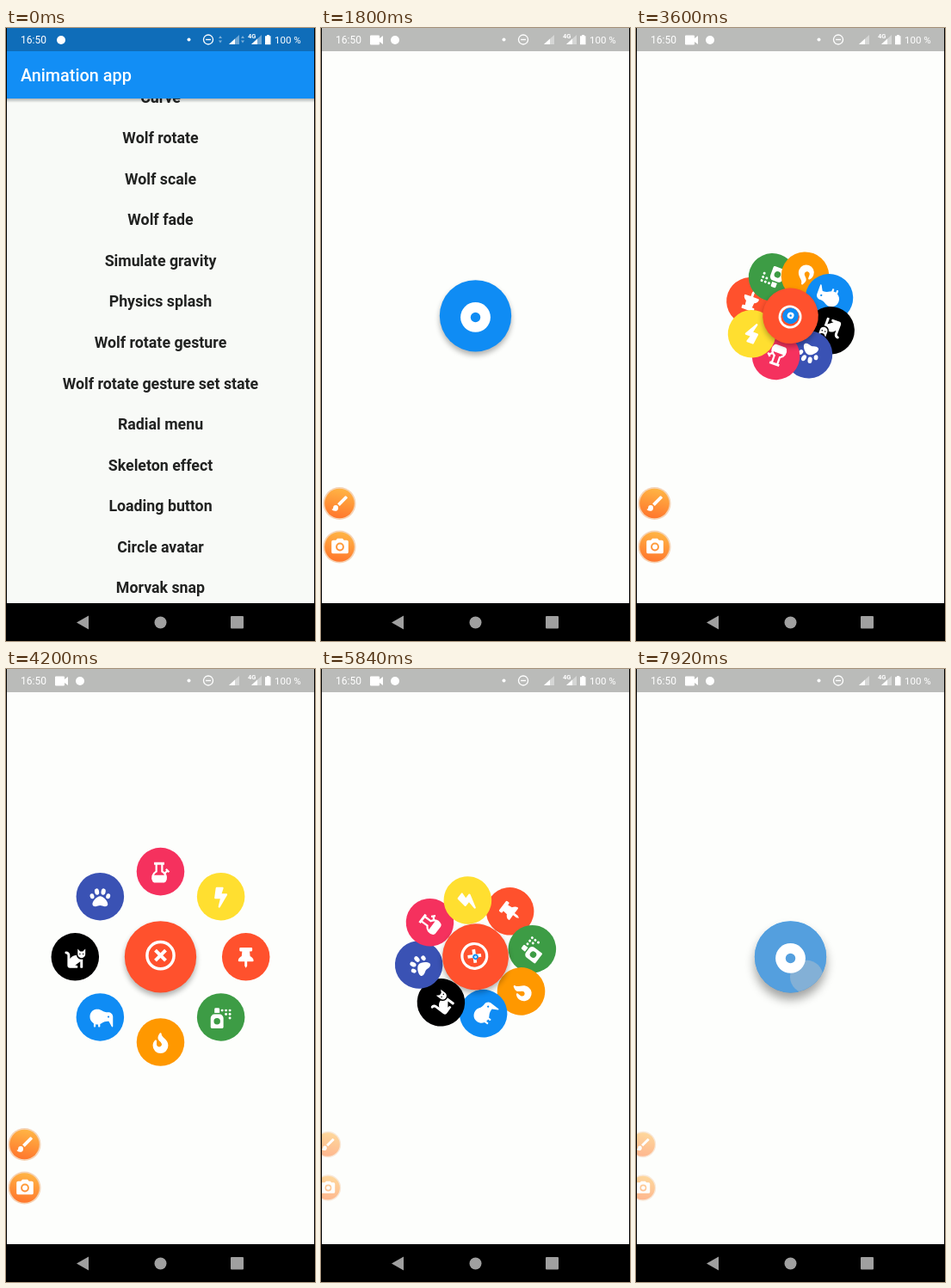
Animation, 359 px wide and 713 px high, one loop 8000 ms. Source, as an HTML page:

```html
<!DOCTYPE html>
<html lang="en">
<head>
<meta charset="utf-8">
<title>Radial menu</title>
<style>
html, body { margin: 0; width: 100%; height: 100%; overflow: hidden; background: #000; }
svg { display: block; width: 100%; height: 100%; font-family: Roboto, Arial, sans-serif; }
</style>
</head>
<body>
<svg id="stage" viewBox="0 0 359 713"></svg>
<script>
const LOOP = 8000, DP = 0.992, R = 28 * DP, CX = 179.5, CY = 334.8;
const BLUE = '#0f8cf4', RED = '#ff512d';

// Moments at which the screen refreshes: [first, last, count]
const refreshes = [
  [0, 0, 1], [40, 840, 17], [880, 1360, 7], [1560, 1800, 3], [3080, 3200, 2],
  [3360, 3600, 3], [3760, 3880, 2], [4040, 4040, 1], [4200, 4320, 2], [4560, 4960, 6],
  [5440, 5560, 2], [5760, 5840, 2], [6040, 6480, 6], [6640, 6640, 1], [7840, 7920, 2]
].flatMap(([a, b, n]) => Array.from({ length: n },
  (_, i) => n < 2 ? a : a + Math.round((b - a) * i / (n - 1) / 40) * 40));

const rows = ['Curve', 'Wolf rotate', 'Wolf scale', 'Wolf fade', 'Simulate gravity',
  'Physics splash', 'Wolf rotate gesture', 'Wolf rotate gesture set state', 'Radial menu',
  'Skeleton effect', 'Loading button', 'Circle avatar', 'Morvak snap'];

const path = d => `<path fill-rule="evenodd" d="${d}"/>`;
const dot = (x, y, r) => `<circle cx="${x}" cy="${y}" r="${r}"/>`;
const toe = (x, y, rx, ry, a) =>
  `<ellipse rx="${rx}" ry="${ry}" transform="translate(${x} ${y}) rotate(${a})"/>`;

// Clockwise from the right: colour, icon width, icon
const items = [
  [RED, 384, path('M298 214L286 96h42a24 24 0 0 0 24-24V24a24 24 0 0 0-24-24H56a24 24 0 0 0-24 24v48a24 24 0 0 0 24 24h42L86 214C37 237 0 277 0 328a24 24 0 0 0 24 24h136v104l32 56 32-56V352h136a24 24 0 0 0 24-24c0-51-38-91-86-114z')],
  ['#3d9c45', 512, path('M224 128V32a32 32 0 0 0-32-32h-64a32 32 0 0 0-32 32v96zM224 160H96a96 96 0 0 0-96 96v224a32 32 0 0 0 32 32h256a32 32 0 0 0 32-32V256a96 96 0 0 0-96-96zM160 416a80 80 0 1 1 0-160 80 80 0 0 1 0 160z')
    + [[288, 64], [384, 64], [480, 64], [384, 160], [480, 160], [480, 256]].map(([x, y]) => dot(x, y, 32)).join('')],
  ['#ff9800', 384, path('M216 24c0-24-31-33-44-13C48 192 224 200 224 288c0 36-29 64-65 64s-63-30-63-65v-85c0-22-26-33-41-17C28 213 0 261 0 320a192 192 0 0 0 384 0c0-170-168-193-168-296z')],
  [BLUE, 512, path('M576 218C573 157 518 112 458 112h-10c-53 0-104-16-147-46-42-29-96-42-154-29C129 41 0 78 0 224c0 71 39 133 96 166v74q0 16 16 16h16q16 0 16-16v-54q32 8 64 5v49q0 16 16 16h16q16 0 16-16v-59q22-8 40-20c46-30 98-49 152-49h24l74 136c8 14 30 8 30-8zM464 248a24 24 0 1 1 0-48 24 24 0 0 1 0 48z')],
  ['#000', 512, path('M291 192c-20 0-107 2-163 86v-86a96 96 0 0 0-96-96 32 32 0 0 0 0 64 32 32 0 0 1 32 32v256a64 64 0 0 0 64 64h176q16 0 16-16v-16a32 32 0 0 0-32-32h-32l128-96v144q0 16 16 16h32q16 0 16-16V290c-75 22-144-28-157-98zM448 96h-64l-64-64v134a96 96 0 0 0 192 0V32zM376 176a16 16 0 1 1 0-32 16 16 0 0 1 0 32zM456 176a16 16 0 1 1 0-32 16 16 0 0 1 0 32z')],
  ['#3a52b4', 512, path('M256 224c-79 0-192 123-192 200 0 35 27 56 72 56 49 0 81-25 120-25 40 0 72 25 120 25 45 0 72-21 72-56 0-77-113-200-192-200z')
    + toe(56, 224, 52, 65, -15) + toe(175, 112, 55, 80, -12) + toe(337, 112, 55, 80, 12) + toe(456, 224, 52, 65, 15)],
  ['#f5315e', 448, path('M302 512c24 0 45-13 57-33a190 190 0 0 0-2-194l43-43 21 21 34-34-76-76-34 34 21 21-39 39q-17-17-39-29V64h32V0H64v64h32v154A192 192 0 0 0 26 479c12 20 33 33 56 33zM120 259l24-13V64h96v182l24 13c25 15 44 36 57 61H63c13-25 32-46 57-61z')],
  ['#ffdf30', 320, path('M296 160H180l43-130C227 15 216 0 200 0H56C44 0 34 9 32 21L0 261c-2 14 10 27 24 27h119L97 482c-4 16 8 30 23 30 8 0 16-4 21-12l176-304c9-16-3-36-21-36z')]
];

const smallButton = ([color, width, icon]) => `<g class="item"><circle r="${R}" fill="${color}"/>
  <g fill="#fff" transform="translate(0 1.1) scale(${24 * DP / 512}) translate(${-width / 2} -256)">${icon}</g></g>`;

const bigButton = (id, color, x, y, icon) => `<g id="${id}"><circle r="${R}" fill="${color}"/>
  <g clip-path="url(#disc)"><circle id="${id}Glow" r="${R}" fill="#bcbcbc"/>
  <circle id="${id}Splash" cx="${x}" cy="${y}" fill="#c8c8c8"/></g>
  <g transform="translate(0 1.1)">${icon}</g></g>`;

const floater = (y, icon) => `<g class="floater" data-y="${y}">
  <circle r="19" fill="#f6d3b4"/><circle r="17.3" fill="url(#amber)"/>
  <g fill="#fff" transform="translate(.5 0) scale(.98) translate(-12 -12)">${icon}</g></g>`;

const signal = x => `<path d="M${x} 19l12-11v11z" opacity=".4"/><path d="M${x} 19l7-6.4v6.4z"/>`;
const arrows = x => `<path d="M${x - 2} 12l2-3 2 3zM${x - 2} 14.500l2 3 2-3z"/>`;

const stage = document.getElementById('stage');
stage.innerHTML = `
<defs>
  <linearGradient id="amber" x1=".6" y1="0" x2=".4" y2="1">
    <stop offset="0" stop-color="#ffb545"/><stop offset="1" stop-color="#ff762c"/></linearGradient>
  <linearGradient id="barShade" x1="0" y1="0" x2="0" y2="1">
    <stop offset="0" stop-opacity=".28"/><stop offset="1" stop-opacity="0"/></linearGradient>
  <clipPath id="disc"><circle r="${R}"/></clipPath>
  <clipPath id="rowClip"><rect x="37" y="439" width="285" height="42" rx="2"/></clipPath>
  <clipPath id="screen"><rect x="1" width="357" height="669"/></clipPath>
  <filter id="soft" x="-50%" y="-50%" width="200%" height="200%"><feGaussianBlur id="blur"/></filter>
</defs>
<rect width="359" height="713"/>
<g clip-path="url(#screen)">
  <g id="list">
    <rect width="359" height="669" fill="#f8faf7"/>
    <g clip-path="url(#rowClip)">
      <rect id="rowGlow" x="37" y="439" width="285" height="42"/>
      <circle id="rowSplash" cx="223" cy="460"/>
    </g>
    <g font-size="17.8" font-weight="700" text-anchor="middle" fill="#212221">
      ${rows.map((s, i) => `<text x="179.5" y="${86.5 + 47.58 * i}">${s}</text>`).join('')}
    </g>
    <rect y="82" width="359" height="5" fill="url(#barShade)"/>
    <rect width="359" height="82" fill="#128ef5"/>
    <rect width="359" height="27" fill="#0f6db9"/>
    <text x="17" y="62" font-size="19.84" font-weight="500" fill="#fff">Animation app</text>
  </g>
  <g id="page">
    <rect width="359" height="840" fill="#fdfefc"/>
    <rect width="359" height="27" fill="#babbb9"/>
    <g transform="translate(${CX} ${CY})">
      <g id="ring">${items.map(smallButton).join('')}</g>
      <circle id="shadow" filter="url(#soft)"/>
      ${bigButton('close', RED, -12.4, -15.4, `<g fill="none" stroke="#fff" stroke-width="2.3">
        <circle r="10.4"/><path d="M-4 -4L4 4M4 -4L-4 4" stroke-width="2.7"/></g>`)}
      ${bigButton('open', BLUE, 12.4, 15.4, `<circle r="11.6" fill="#fff"/><circle id="pupil" r="3.8" fill="${BLUE}"/>`)}
    </g>
  </g>
  ${floater(553, path('M7 14a3 3 0 0 0-3 3c0 1.3-1.200 2-2 2 1 1.200 2.500 2 4 2a4 4 0 0 0 4-4 3 3 0 0 0-3-3zM20.700 4.600l-1.300-1.300a1 1 0 0 0-1.400 0L9 12.250 11.750 15l9-9a1 1 0 0 0 0-1.400z'))}
  ${floater(603.500, path('M9 2L7.200 4H4a2 2 0 0 0-2 2v12a2 2 0 0 0 2 2h16a2 2 0 0 0 2-2V6a2 2 0 0 0-2-2h-3.200L15 2zM12 17a5 5 0 1 1 0-10 5 5 0 0 1 0 10z') + dot(12, 12, 3))}
  <g fill="#fff">
    <text x="17" y="18" font-size="12">16:50</text>
    <path id="video" d="M58 8.500h9a1 1 0 0 1 1 1v2.500l4-3v10l-4-3v2.500a1 1 0 0 1-1 1h-9a1 1 0 0 1-1-1v-9a1 1 0 0 1 1-1z"/>
    <circle id="badge" cy="14" r="5"/>
    ${dot(212.5, 13.5, 2)}
    <circle cx="235" cy="13.500" r="5.500" fill="none" stroke="#fff" stroke-width="1.300"/>
    <rect x="232" y="12.800" width="6" height="1.400"/>
    <g id="arrows" opacity=".45">${arrows(249)}${arrows(275)}</g>
    ${signal(259)}${signal(285)}
    <text x="281" y="12" font-size="7.500" font-weight="700">4G</text>
    <path d="M303 8h3v1.200h1.500v10h-6.500v-10h2z"/>
    <text x="312" y="18" font-size="11.500">100 %</text>
  </g>
</g>
<g fill="#a0a0a0"><path d="M82 691.500l14-8v16z"/>${dot(179.5, 691.5, 7)}
  <rect x="261" y="684" width="15" height="14.500" rx="1"/></g>`;

const el = Object.fromEntries([...stage.querySelectorAll('[id]')].map(n => [n.id, n]));
const ringItems = [...stage.querySelectorAll('.item')];
const floaters = [...stage.querySelectorAll('.floater')];
const set = (node, attrs) => { for (const k in attrs) node.setAttribute(k, attrs[k]); };
const ramp = (t, a, b) => Math.min(1, Math.max(0, (t - a) / (b - a)));
const mix = (a, b, k) => a + (b - a) * k;
const easeOut = k => 1 - (1 - k) ** 2;

// cubic-bezier(.4, 0, .2, 1)
function fastOutSlowIn(x) {
  let lo = 0, hi = 1;
  for (let i = 0; i < 24; i++) {
    const s = (lo + hi) / 2, q = 1 - s;
    if (1.2 * q * q * s + 0.6 * q * s * s + s ** 3 < x) lo = s; else hi = s;
  }
  return lo * lo * (3 - 2 * lo);
}

// Touch feedback between finger down and up
function touch(t, down, up, speed) {
  const fade = t < down ? 0 : 1 - ramp(t, up, up + 200);
  return {
    glow: ramp(t, down, down + 180) * fade,
    fade,
    radius: Math.max(0, Math.min(t, up) - down) * speed + Math.max(0, t - up) * speed * 5
  };
}

function showInk(id, ink, glowAlpha, splashAlpha) {
  set(el[id + 'Glow'], { opacity: ink.glow * glowAlpha });
  set(el[id + 'Splash'], { r: ink.radius, opacity: ink.fade * splashAlpha });
}

function drawMenu(t, openInk, closeInk) {
  const k = t < 5000 ? ramp(t, 3150, 4050) : 1 - ramp(t, 5543, 6443);
  const scale = 1.5 * (1 - fastOutSlowIn(k));
  const angle = 360 * easeOut(ramp(k, 0.3, 0.9));
  set(el.ring, { transform: `rotate(${angle})` });
  ringItems.forEach((node, i) => {
    const a = i * Math.PI / 4, d = 100 * DP * k;
    set(node, { transform: `translate(${d * Math.cos(a)} ${d * Math.sin(a)})` });
  });
  set(el.open, { transform: `rotate(${angle}) scale(${scale})` });
  set(el.close, { transform: `rotate(${angle}) scale(${scale - 1.5})` });

  const lift = Math.max(openInk.glow, closeInk.glow);
  const size = Math.max(scale, 1.5 - scale);
  set(el.shadow, { r: R * size, cy: mix(4, 8, lift) * size / 1.5, opacity: mix(0.3, 0.36, lift) });
  set(el.blur, { stdDeviation: mix(3.4, 6, lift) });
  set(el.pupil, { fill: `color-mix(in srgb, #bcbcbc ${40 * openInk.glow}%, ${BLUE})` });
}

function draw(t) {
  showInk('row', touch(t, 460, 1300, 0.187), 0.175, 0.14);

  const enter = ramp(t, 1500, 1800);
  set(el.page, {
    opacity: enter * enter,
    transform: `translate(0 ${160 * (1 - fastOutSlowIn(enter))})`
  });
  set(el.arrows, { visibility: t < 1560 ? 'visible' : 'hidden' });

  const openInk = t < 5000 ? touch(t, 2880, 3150, 0.045) : touch(t, 7636, LOOP, 0.045);
  const closeInk = touch(t, 5240, 5543, 0.045);
  showInk('open', openInk, 0.4, 0.4);
  showInk('close', closeInk, 0.4, 0.4);
  drawMenu(t, openInk, closeInk);

  const arrive = easeOut(ramp(t, 80, 420));
  set(el.video, { opacity: arrive });
  set(el.badge, { cx: mix(64, 86, arrive) });
  const tuck = ramp(t, 4480, 4960);
  floaters.forEach(node => set(node, {
    transform: `translate(${mix(mix(-22, 21.5, arrive), 8, tuck)} ${node.dataset.y}) scale(${mix(1, 0.8, tuck)})`,
    opacity: mix(1, 0.52, tuck)
  }));
}

let start;
function tick(now) {
  start ??= now;
  const t = (now - start) % LOOP;
  draw(refreshes.findLast(m => m <= t));
  requestAnimationFrame(tick);
}
draw(0);
requestAnimationFrame(tick);
</script>
</body>
</html>
```
